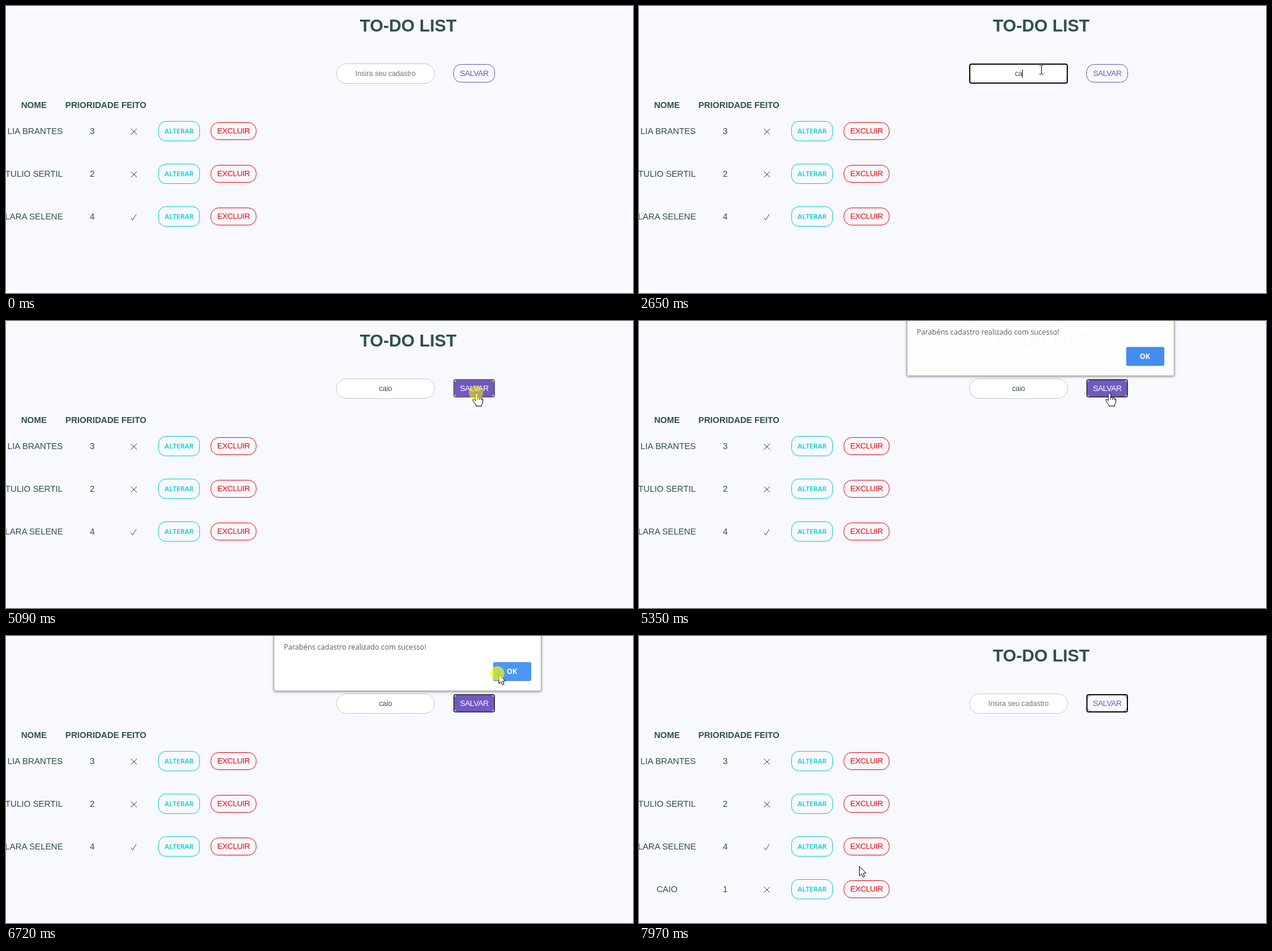
Recreate the animation shown at these times as an HTML page. Size 1054 by 484 pixels, loop 8000 ms.

```html
<!DOCTYPE html>
<html lang="pt-BR">
<head>
<meta charset="utf-8">
<title>To-do list</title>
<style>
  html, body { margin: 0; width: 100%; height: 100%; overflow: hidden; background: #f8f8ff; }
  svg { display: block; width: 100%; height: 100%; }
  text { font: 14.4px "Liberation Sans", Arial, sans-serif; fill: #2f4f4f; text-anchor: middle; white-space: pre; }
  rect, path { fill: none; }
  .title { font-size: 28.8px; font-weight: bold; }
  .head { font-weight: bold; }
  .mark { stroke: #2f4f4f; stroke-width: 1; }
  .button { font-size: 13.33px; letter-spacing: -.4px; }
  .edit { stroke: #00ced1; }
  .remove { stroke: #f00; }
  text.edit { font: 600 11.5px "Open Sans", sans-serif; fill: #00ced1; stroke: none; }
  text.remove { fill: #f00; stroke: none; }
  #field { font-size: 12px; }
  .ring { stroke-width: 2; }
  #dialog { transform-origin: 675px 0; }
  #dialog .panel { fill: #fff; stroke: #a9a9ae; filter: drop-shadow(0 1px 2px rgba(0, 0, 0, .45)); }
  #dialog .message { font: 12.2px "Open Sans", sans-serif; fill: #5a5a5f; text-anchor: start; }
  #dialog .ok { font: 700 12px "Open Sans", sans-serif; fill: #fff; }
  .pointer { fill: #fff; stroke: #000; stroke-linejoin: round; }
</style>
</head>
<body>
<svg id="stage" viewBox="0 0 1054 484">
  <defs>
    <clipPath id="pill"><rect x="752" y="98" width="70" height="31" rx="12"/></clipPath>
  </defs>

  <text class="title" x="676" y="43">TO-DO LIST</text>
  <text class="head" x="47" y="172">NOME</text>
  <text class="head" x="145" y="172">PRIORIDADE</text>
  <text class="head" x="215" y="172">FEITO</text>
  <g id="rows"></g>

  <rect x="555.5" y="97.5" width="165" height="33" rx="16.5" style="fill:#fff;stroke:#c8c8cc"/>
  <text id="field" x="638" y="118"></text>
  <path id="caret" stroke="#111" d="M0 107v14"/>
  <rect id="fieldRing" class="ring" x="556" y="98" width="164" height="32" rx="3" stroke="#101010"/>

  <g clip-path="url(#pill)">
    <rect id="fill" x="752" y="0" width="70" height="100" rx="35" ry="14" style="fill:#7159c1"/>
  </g>
  <rect x="752.5" y="98.5" width="69" height="30" rx="12" stroke="#7159c1"/>
  <text id="save" class="button" x="787" y="118">SALVAR</text>
  <rect id="saveRing" class="ring" x="753" y="99" width="68" height="29" rx="3"/>

  <g id="dialog">
    <rect class="panel" x="450.5" y="-60" width="449" height="152.5" rx="2"/>
    <text class="message" x="467" y="23">Parabéns cadastro realizado com sucesso!</text>
    <rect id="okBox" x="819" y="44" width="64" height="32" rx="3"/>
    <text class="ok" x="850.5" y="64">OK</text>
  </g>

  <g id="cursor">
    <path id="arrow" class="pointer" d="M.5.5V16.4L4.2 13 6.6 18.6 9.2 17.4 6.9 12H11.7Z"/>
    <path id="beam" stroke="#111" d="M-3-7.5H0M1-7.5H4M.5-7V6.5M-3 7H0M1 7H4"/>
    <g id="hand">
      <path class="pointer" d="M-2 2.4Q-2 .5 0 .5T2 2.4V8Q4.500 6.700 5.500 8.800Q7.800 7.800 8.700 10Q10.600 9.700 10.600 12V15.500Q10.600 18.500 8.600 20V22.500H-1V20.500Q-3.500 17.500-6 13.500Q-7 11.500-5.500 10.900Q-4 10.500-2 13.500Z"/>
      <path stroke="#000" d="M2 8V12M5.5 9V12M8.600 10V12.500"/>
    </g>
  </g>
  <circle id="click" r="12" fill="#ff0"/>
</svg>

<script>
const LOOP = 8000;
const $ = id => document.getElementById(id);
const between = (t, from, to) => t >= from && t < to;
const clamp = v => Math.max(0, Math.min(1, v));
const progress = (t, from, to) => clamp((t - from) / (to - from));
const easeOut = p => 1 - (1 - p) ** 2;
const show = (id, on) => $(id).style.display = on ? '' : 'none';

const CROSS = y => `M210 ${y - 4}l10 10m0-10l-10 10`;
const CHECK = y => `M210 ${y + 2}l3 4 6-10`;
const people = [
  ['LIA BRANTES', 3, CROSS, 49],
  ['TULIO SERTIL', 2, CROSS, 47],
  ['LARA SELENE', 4, CHECK, 47],
  ['CAIO', 1, CROSS, 47]
];

$('rows').innerHTML = people.map(([name, priority, mark, x], i) => {
  const y = 211 + 72 * i;
  return `<g>
    <text x="${x}" y="${y + 5}">${name}</text>
    <text x="145" y="${y + 5}">${priority}</text>
    <path class="mark" d="${mark(y)}"/>
    <rect class="edit" x="256.5" y="${y - 16.5}" width="69" height="33" rx="12"/>
    <text class="edit" x="291" y="${y + 4}">ALTERAR</text>
    <rect class="remove" x="344.5" y="${y - 14.5}" width="76" height="29" rx="13"/>
    <text class="remove button" x="382.500" y="${y + 4}">EXCLUIR</text>
  </g>`;
}).join('');
const newRow = $('rows').lastElementChild;

// start time, positions, ms per position, then start, control and end points
const moves = [
  [120, 11, 75, [875, 298], [760, 200], [679, 114]],
  [950, 2, 80, [678, 111], [677, 110], [676, 108]],
  [4060, 11, 80, [725, 122], [745, 146], [791, 121]],
  [6010, 6, 80, [803, 106], [815, 84], [828, 64]],
  [7420, 3, 90, [720, 115], [600, 200], [470, 250]],
  [7820, 3, 75, [400, 335], [309, 380], [370, 388]]
];

function cursorAt(t) {
  const move = moves.findLast(m => t >= m[0]);
  if (!move) return null;
  const [start, count, pause, a, b, c] = move;
  const p = Math.min(Math.floor((t - start) / pause), count - 1) / (count - 1);
  const s = p * p * (3 - 2 * p);
  return [0, 1].map(k => Math.round((1 - s) ** 2 * a[k] + 2 * s * (1 - s) * b[k] + s * s * c[k]));
}

function drawCursor(t) {
  const at = cursorAt(t);
  show('cursor', at);
  if (!at) return;
  const [x, y] = at;
  const beam = between(t, 870, 4060);
  const hand = between(t, 4060, 6910) && x > 752 && y > 98 && y < 129;
  $('cursor').setAttribute('transform', `translate(${x} ${y})`);
  show('beam', beam);
  show('hand', hand);
  show('arrow', !beam && !hand);
}

function drawField(t) {
  const typed = between(t, 2500, 6910);
  const field = $('field');
  field.textContent = !typed ? 'Insira seu cadastro' : 'caio'.slice(0, t < 2650 ? 1 : t < 3530 ? 2 : 4);
  field.style.fill = typed ? '#2f4f4f' : '#757575';
  show('fieldRing', between(t, 1180, 4930));
  show('caret', between(t, 1180, 1790) || between(t, 2270, 3230) || between(t, 3530, 4060));
  const x = typed ? 638 + field.getComputedTextLength() / 2 : 638;
  $('caret').setAttribute('transform', `translate(${Math.floor(x) + .5} 0)`);
}

function drawSave(t) {
  const hover = easeOut(progress(t, 4700, 4930)) - easeOut(progress(t, 6910, 7270));
  $('fill').setAttribute('y', -1 + 44 * hover);
  const mix = [113, 89, 193].map(v => Math.round(v + (255 - v) * hover));
  $('save').style.fill = `rgb(${mix})`;
  show('saveRing', t >= 4930);
  $('saveRing').style.stroke = t < 5250 ? '#666070' : t < 6910 ? '#444048' : t < 7270 ? '#25222b' : '#101010';
}

function drawDialog(t) {
  const shown = easeOut(progress(t, 5170, 5380)) - progress(t, 6800, 7005);
  const away = 1 - shown;
  show('dialog', shown > 0);
  $('dialog').style.opacity = shown;
  $('dialog').style.transform = `translateY(${-19 * away}px) scale(${1 + .01 * away})`;
  $('okBox').style.fill = t < 6250 ? '#418bee' : '#4f95f3';
}

function drawClick(t) {
  const click = [
    [1180, 1430, 674, 107, .7],
    [4930, 5250, 790, 121, t < 5090 ? .65 : .5],
    [6580, 6820, 826, 63, .65]
  ].find(([from, to]) => between(t, from, to));
  show('click', click);
  if (!click) return;
  const [, , x, y, alpha] = click;
  $('click').setAttribute('transform', `translate(${x} ${y})`);
  $('click').style.opacity = alpha;
}

const began = performance.now();
function draw() {
  const t = (performance.now() - began) % LOOP;
  newRow.style.display = t >= 6910 ? '' : 'none';
  drawField(t);
  drawSave(t);
  drawDialog(t);
  drawCursor(t);
  drawClick(t);
  requestAnimationFrame(draw);
}
draw();
</script>
</body>
</html>
```
